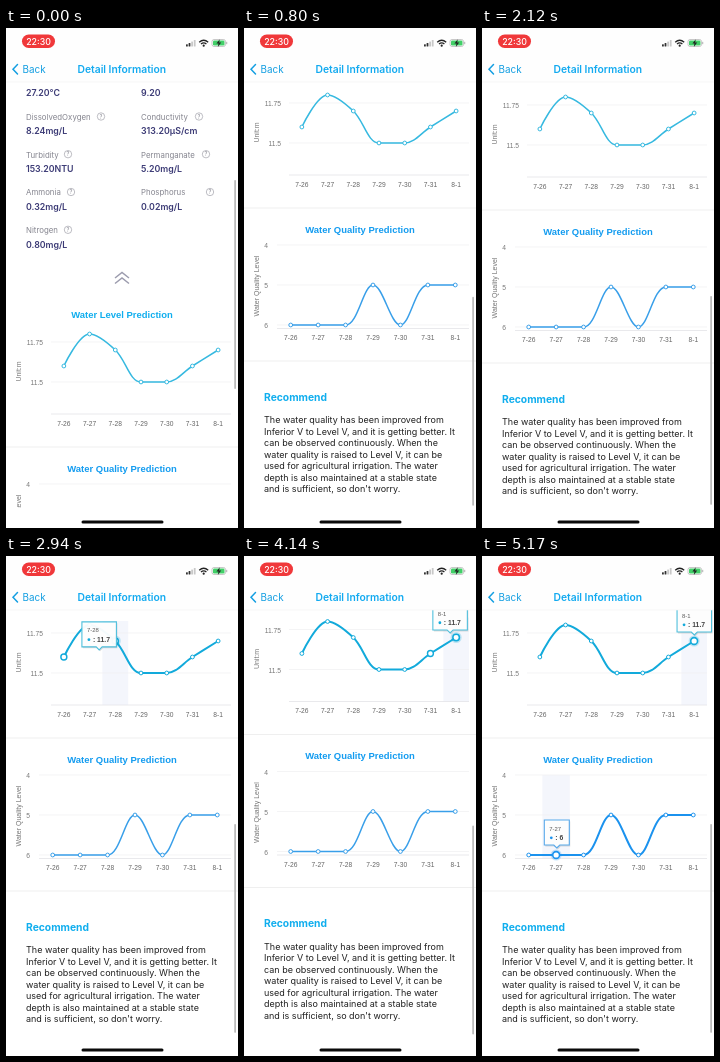
An HTML page for the animation above (5220 ms loop, 232 by 500 pixels).

```html
<!DOCTYPE html>
<html lang="en">
<head>
<meta charset="utf-8">
<title>Water detail</title>
<style>
  html, body { margin: 0; width: 100%; height: 100%; overflow: hidden; background: #fff; }
  svg { display: block; width: 232px; height: 500px; }
  text { font-family: Inter, "Open Sans", sans-serif; }
  .chart text { font-family: "Liberation Sans", Arial, sans-serif; }
</style>
</head>
<body>
<svg id="stage" viewBox="0 0 232 500"></svg>
<script>
const LOOP = 5220;
const BLUE = '#10aeee';
const NS = 'http://www.w3.org/2000/svg';
const stage = document.getElementById('stage');

function add(parent, tag, attrs = {}) {
  const el = document.createElementNS(NS, tag);
  set(el, attrs);
  parent.append(el);
  return el;
}
function set(el, attrs) {
  for (const key in attrs) el.setAttribute(key, attrs[key]);
}
// y is the vertical middle of the capitals
function label(parent, str, x, y, size, fill, more = {}) {
  const el = add(parent, 'text', { x, y: y + size * 0.38, 'font-size': size, fill, ...more });
  el.textContent = str;
  return el;
}
function stroke(parent, d, color, width, more = {}) {
  return add(parent, 'path', { d, fill: 'none', stroke: color, 'stroke-width': width, ...more });
}
const clamp = (v, a, b) => Math.max(Math.min(a, b), Math.min(Math.max(a, b), v));
const BOLD = { 'font-weight': 700 };
const SEMI = { 'font-weight': 600 };
const MIDDLE = { 'text-anchor': 'middle' };
const END = { 'text-anchor': 'end' };

const page = add(stage, 'g');

// Readings
function reading(x, y, name, value, iconX) {
  if (name) {
    label(page, name, x, y, 7.85, '#85858f');
    add(page, 'circle', { cx: iconX, cy: y - 0.5, r: 3.7, fill: 'none', stroke: '#92929c', 'stroke-width': 0.6 });
    label(page, '?', iconX, y - 0.4, 5.6, '#85858f', MIDDLE);
  }
  label(page, value, x, y + 14, 8.8, '#3b3a75', SEMI);
}
[
  [20, 51, '', '27.20°C'], [135, 51, '', '9.20'],
  [20, 89, 'DissolvedOxygen', '8.24mg/L', 95], [135, 89, 'Conductivity', '313.20µS/cm', 193],
  [20, 126.7, 'Turbidity', '153.20NTU', 62], [135, 126.7, 'Permanganate', '5.20mg/L', 200],
  [20, 164.5, 'Ammonia', '0.32mg/L', 65], [135, 164.5, 'Phosphorus', '0.02mg/L', 204],
  [20, 202.3, 'Nitrogen', '0.80mg/L', 62]
].forEach(r => reading(...r));
stroke(page, 'M109 250l7-5.5 7 5.5M109 255.5l7-5.5 7 5.5', '#9c9cae', 1.5);
stroke(page, 'M0 419H232M0 572H232', '#efefef', 1);

// Smooth curve whose handles never leave the span of their segment
function smooth(pts, k = 0.36) {
  let d = `M${pts[0]}`;
  let out = pts[0];
  for (let i = 1; i < pts.length; i++) {
    const a = pts[i - 1], p = pts[i], n = pts[i + 1];
    let into = p, next = p;
    if (n) {
      const before = Math.hypot(p[0] - a[0], p[1] - a[1]);
      const after = Math.hypot(n[0] - p[0], n[1] - p[1]);
      const share = after / (before + after);
      next = p.map((v, j) => clamp(v + (n[j] - a[j]) * k * share, v, n[j]));
      into = p.map((v, j) => clamp(v - (next[j] - v) * before / after, a[j], v));
      next = p.map((v, j) => v + (v - into[j]) * after / before);
    }
    d += `C${out} ${into} ${p}`;
    out = next;
  }
  return d;
}

const DAYS = ['7-26', '7-27', '7-28', '7-29', '7-30', '7-31', '8-1'];

function makeChart(o) {
  const g = add(page, 'g', { class: 'chart' });
  const step = (225 - o.left) / 7;
  const pts = o.values.map((v, i) => [o.left + step * (i + 0.5), o.yOf(v)]);
  const band = add(g, 'rect', { y: o.top, width: step, height: o.bottom - o.top, fill: '#dfe5f5', opacity: 0.35 });

  label(g, o.title, 116, o.titleY, 9.46, o.titleColor, { ...BOLD, ...MIDDLE });
  o.ticks.forEach(v => {
    stroke(g, `M${o.left} ${o.yOf(v)}H225`, '#efeff1', 0.7);
    label(g, v, o.tickX, o.yOf(v) + 0.7, 6.7, '#777', END);
  });
  stroke(g, `M${o.left} ${o.bottom}H225`, '#e4e4e8', 0.8);
  DAYS.forEach((day, i) => label(g, day, pts[i][0], o.dayY, 6.7, '#666', MIDDLE));
  label(g, o.axis, 0, 0, 7, '#777', { ...MIDDLE, transform: `translate(12 ${o.axisY}) rotate(-90)` });

  const line = stroke(g, smooth(pts), o.color);
  const halo = add(g, 'circle', { r: 5.5, fill: o.bright, opacity: 0.25 });
  const dots = pts.map(([cx, cy]) => add(g, 'circle', { cx, cy, fill: '#fff', stroke: o.color }));

  const tip = add(g, 'g');
  const w = o.tipWidth;
  const box = `M${-w / 2} 0H${w / 2}V25H3L0 28L-3 25H${-w / 2}Z`;
  add(tip, 'path', { d: box, fill: '#000', opacity: 0.13, transform: 'translate(1 1.5)' });
  add(tip, 'path', { d: box, fill: '#fff', 'fill-opacity': 0.95, stroke: o.tipColor, 'stroke-width': 1.1 });
  const day = label(tip, '', 5 - w / 2, 8.3, 5.9, '#555');
  add(tip, 'circle', { cx: 7 - w / 2, cy: 17.8, r: 1.4, fill: o.bright });
  const value = label(tip, '', 11 - w / 2, 17.8, 6.8, '#444', BOLD);

  // picks: [time, index]; path: [time, x, top] of the tooltip
  return t => {
    const now = o.picks.findLastIndex(p => t >= p[0]);
    const on = now >= 0;
    const pick = on ? o.picks[now][1] : -1;
    const lit = on ? clamp((t - o.picks[0][0]) / 150, 0, 1) : 0;
    const since = on ? t - o.picks[now][0] : 0;
    const last = now > 0 ? o.picks[now - 1][1] : -1;

    set(line, { 'stroke-width': 1.5 + 0.5 * lit, stroke: lit ? o.bright : o.color });
    dots.forEach((dot, i) => {
      const grow = i === pick ? clamp(since / 100, 0, 1) : i === last ? clamp(1 - since / 300, 0, 1) : 0;
      set(dot, { r: 1.9 + 1.5 * grow, 'stroke-width': 1 + 0.6 * grow, stroke: lit ? o.bright : o.color });
    });
    for (const el of [tip, band, halo]) el.style.display = on ? '' : 'none';
    if (!on) return;
    set(band, { x: o.left + step * pick });
    set(halo, { cx: pts[pick][0], cy: pts[pick][1] });
    set(tip, { transform: `translate(${track(o.path, t, 1)} ${track(o.path, t, 2)})`, opacity: lit });
    day.textContent = DAYS[pick];
    value.textContent = ': ' + o.values[pick];
  };
}

// Eased value of one column in a table of [time, ...values]
function track(rows, t, col) {
  const i = rows.findIndex(r => r[0] > t);
  if (i < 0) return rows[rows.length - 1][col];
  if (i === 0) return rows[0][col];
  const a = rows[i - 1], b = rows[i];
  const u = (t - a[0]) / (b[0] - a[0]);
  return a[col] + (b[col] - a[col]) * u * (2 - u);
}

const charts = [
  makeChart({
    title: 'Water Level Prediction', titleY: 286.5, titleColor: BLUE,
    axis: 'Unit:m', axisY: 343.5, values: [11.6, 11.8, 11.7, 11.5, 11.5, 11.6, 11.7],
    ticks: [11.75, 11.5], tickX: 37, left: 45, top: 302, bottom: 386, dayY: 395,
    yOf: v => 354 - (v - 11.5) * 160,
    color: '#36b9e0', bright: '#12aadb', tipColor: '#4fbfdc', tipWidth: 34.5,
    picks: [[2700, 0], [2860, 2], [3200, 3], [3500, 4], [3800, 5], [4050, 6]],
    path: [
      [2840, 58, 304], [2940, 93, 303], [3150, 110, 288], [3230, 110, 288],
      [3450, 135.5, 320], [3500, 136, 320], [3590, 157, 320], [3700, 161, 320],
      [3800, 161, 320], [3960, 186.5, 304], [4050, 187, 303.5], [4140, 206, 289.5], [4250, 212.3, 288]
    ]
  }),
  makeChart({
    title: 'Water Quality Prediction', titleY: 440, titleColor: '#149cf0',
    axis: 'Water Quality Level', axisY: 497, values: [6, 6, 6, 5, 6, 5, 5],
    ticks: [4, 5, 6], tickX: 24, left: 33, top: 456, bottom: 539.5, dayY: 548.5,
    yOf: v => 536 - (6 - v) * 40,
    color: '#399fe9', bright: '#1b92ee', tipColor: '#58a9ea', tipWidth: 25,
    picks: [[4750, 1]],
    path: [[4750, 74.8, 501]]
  })
];

// Advice
label(page, 'Recommend', 20, 608, 10.3, BLUE, BOLD);
[
  'The water quality has been improved from',
  'Inferior V to Level V, and it is getting better. It',
  'can be observed continuously. When the',
  'water quality is raised to Level V, it can be',
  'used for agricultural irrigation. The water',
  'depth is also maintained at a stable state',
  "and is sufficient, so don't worry."
].forEach((row, i) => label(page, row, 20, 630.8 + 11.5 * i, 9, '#202020'));

// Fixed bars
const bar = add(stage, 'rect', { x: 228.3, width: 1.6, height: 209, rx: 0.8, fill: '#b4b4b4' });
add(stage, 'rect', { width: 232, height: 54, fill: '#fefefe' });
add(stage, 'rect', { y: 480, width: 232, height: 20, fill: '#fff' });
stroke(stage, 'M0 54H232', '#f0f0f0', 0.6);
add(stage, 'rect', { x: 16, y: 6.5, width: 33, height: 13.5, rx: 6.7, fill: '#f0383a' });
label(stage, '22:30', 32.5, 13.2, 8.8, '#fff', { 'font-weight': 500, ...MIDDLE });
[0, 1, 2, 3].forEach(i => add(stage, 'rect', {
  x: 180 + 2.6 * i, y: 16.3 - 1.4 * i, width: 1.8, height: 2.2 + 1.4 * i, rx: 0.5, fill: i < 2 ? '#333' : '#c8c8c8'
}));
stroke(stage, 'M193.2 14.2Q197.7 10.2 202.2 14.2M195 16.1Q197.7 13.8 200.4 16.1', '#222', 1.3);
add(stage, 'circle', { cx: 197.7, cy: 17.7, r: 1.1, fill: '#222' });
add(stage, 'rect', { x: 206, y: 11.5, width: 13.5, height: 7, rx: 2, fill: '#fff', stroke: '#a5a5a5', 'stroke-width': 0.6 });
add(stage, 'rect', { x: 207, y: 12.5, width: 11.5, height: 5, rx: 1.2, fill: '#42cf68' });
add(stage, 'path', { d: 'M213.8 11.2L210.4 15.6H212.5L211.8 18.9L215.2 14.4H213.1Z', fill: '#222' });
add(stage, 'rect', { x: 220.3, y: 13.8, width: 0.9, height: 2.4, fill: '#a5a5a5' });
stroke(stage, 'M11.5 36.5L7 41.2L11.5 46', '#159fe2', 1.5, { 'stroke-linecap': 'round' });
label(stage, 'Back', 16.6, 41.2, 9.9, '#159fe2');
label(stage, 'Detail Information', 115.8, 41, 10.3, '#12aaf0', { ...SEMI, ...MIDDLE });
add(stage, 'rect', { x: 75.5, y: 492.5, width: 82, height: 3, rx: 1.5, fill: '#0a0a0a' });

const SCROLL = [
  [0, 0], [100, 0], [600, 236], [750, 239], [1700, 239], [1950, 237], [3250, 237],
  [3550, 233.5], [3650, 233.5], [4050, 240.5], [4200, 240.5], [4450, 237]
];

function draw(t) {
  const y = track(SCROLL, t, 1);
  set(page, { transform: `translate(0 ${-y})` });
  set(bar, { y: 152 + y * 0.489 });
  charts.forEach(update => update(t));
}

const start = performance.now();
function tick() {
  draw((performance.now() - start) % LOOP);
  requestAnimationFrame(tick);
}
tick();
</script>
</body>
</html>
```
